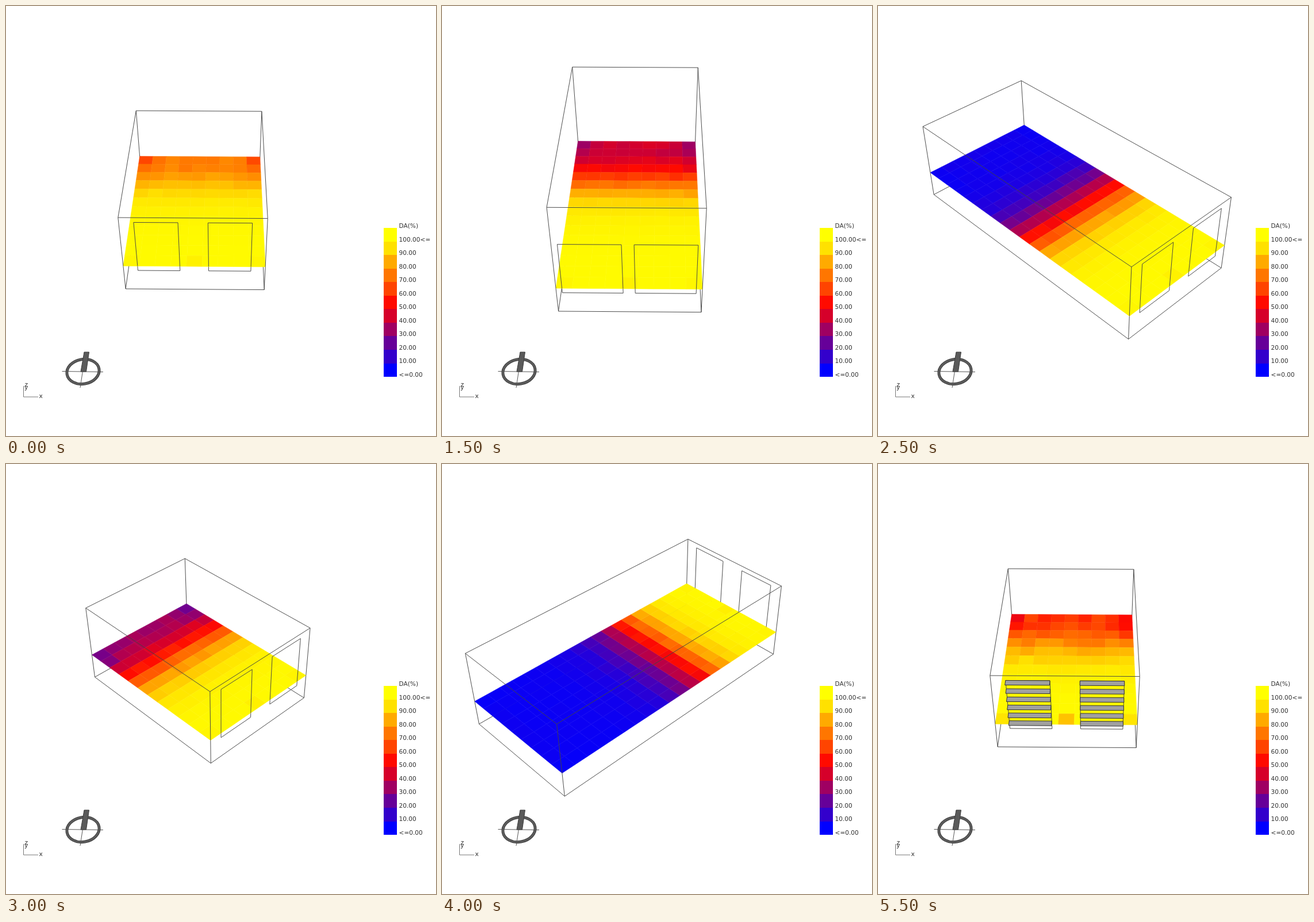
Write an HTML page with a canvas that moves like this. It is 748 px wide and 748 px high and loops after 6000 ms.

```html
<!DOCTYPE html>
<html lang="en">
<head>
<meta charset="utf-8">
<title>Daylight autonomy study</title>
<style>
  html, body { margin: 0; width: 100%; height: 100%; overflow: hidden; background: #fff; }
  #stage { position: relative; width: 748px; height: 748px; }
  canvas, svg { position: absolute; left: 0; top: 0; }
  text { font: 10.6px "DejaVu Sans", Verdana, sans-serif; fill: #333; }
</style>
</head>
<body>
<div id="stage">
  <canvas id="view" width="748" height="748"></canvas>
  <svg width="748" height="748" viewBox="0 0 748 748">
    <g id="legend"><text x="683.5" y="386">DA(%)</text></g>
    <g fill="none" stroke="#777">
      <path d="M30.5 661V680H56"/>
      <g transform="rotate(-10 134 636)">
        <ellipse cx="134" cy="636" rx="28.3" ry="21.4" stroke="#383838" stroke-width="5"/>
        <ellipse cx="134" cy="636" rx="28.3" ry="21.4" stroke="#5c5c5c" stroke-width="3.2"/>
      </g>
      <path d="M97.5 635.5L169 636.5M137 612L129 664" stroke="#555"/>
      <path d="M136 602H144.5L139.5 636H130Z" fill="#5a5a5a" stroke="#3c3c3c"/>
    </g>
    <text x="57.5" y="682">x</text>
    <text x="32.5" y="662">z</text>
    <text x="32" y="667">y</text>
  </svg>
</div>
<script>
const ctx = document.getElementById('view').getContext('2d');
const STOPS = ['0000ff', '3300cc', '660099', '9f0062', 'd6002a', 'ff0a00',
               'ff4400', 'ff7600', 'ffaa00', 'ffe100', 'ffff00']
  .map(h => [0, 2, 4].map(i => parseInt(h.substr(i, 2), 16)));
const STEP = 500, COLS = 9, FLOOR = -2.03, SILL = -.38, HEAD = 3.61;

// rows: depth in cells; low: daylight far from the windows;
// reach: distance at which daylight has dropped halfway to low
const room = (rows, low, reach, more) => ({ rows, low, reach, turn: 0, height: 2.5, louvers: 0, ...more });
const scenes = [
  room(12, 62, 9),
  room(16, 9, 10.2),
  room(16, 20, 10.5, { height: 3 }),
  room(16, 33, 10.85, { height: 3.5 }),
  room(20, 4, 9.6),
  room(20, 3, 9.4, { turn: 45 }),
  room(12, 20, 8, { turn: 45 }),
  room(12, 13, 7.25, { turn: 135 }),
  room(20, 2, 7.5, { turn: 135 }),
  room(16, 2, 8.95, { turn: 225, height: 3.5 }),
  room(12, 55, 8.8),
  room(12, 48, 8.5, { louvers: 6 })
];

function colour(v) {
  const t = Math.max(0, Math.min(99.99, v)) / 10, i = Math.floor(t);
  return `rgb(${STOPS[i].map((c, k) => Math.round(c + (STOPS[i + 1][k] - c) * (t - i)))})`;
}

function noise(a, b, c) {
  const n = Math.sin(a * 12.99 + b * 78.23 + c * 37.72) * 43758.55;
  return (n - Math.floor(n)) * 2 - 1;
}

function daylight(s, id, r, c) {
  const dist = s.rows - r - .5, side = (c - 4) / 4;
  const v = s.low + (98.5 - s.low) / (1 + Math.exp((dist - s.reach) / 1.45));
  const spread = Math.min(1, (100 - v) / 30, v / 15);
  const corner = 9 * Math.pow(side, 6) * Math.exp(-r / 2);
  const wall = 4 * Math.exp(-2 * r);
  // the pier and the side walls shade the cells next to the facade
  const facade = dist < 1 ? (c === 4 ? 1 : Math.pow(side, 8) / 2) * (s.louvers ? 14 : 3) : 0;
  return v + spread * (noise(r, c, id) * (s.louvers ? 4 : 2.2) - corner + wall) - facade;
}

// Fixed perspective camera; the room turns about the origin of the work plane.
function camera(turn) {
  const q = turn * Math.PI / 180 - .0092;
  const cos = Math.cos(q), sin = Math.sin(q);
  return ([x, y, z]) => {
    const a = x * cos - y * sin, b = x * sin + y * cos;
    const w = 1 + .013888 * b - .0116 * z;
    return [374 + (25.19 * a - 41.3) / w, 373.6 + (-24.1 - 16.154 * b - 19.33 * z) / w];
  };
}

function trace(points) {
  ctx.beginPath();
  points.forEach(p => ctx.lineTo(p[0], p[1]));
}

// Outline of a quad as four edges
const loop = pts => pts.map((p, i) => [p, pts[(i + 1) % pts.length]]);

function boxEdges(w, d, top) {
  const ring = z => [[-w, -d, z], [w, -d, z], [w, d, z], [-w, d, z]];
  const lower = ring(FLOOR), upper = ring(top);
  return [...loop(lower), ...loop(upper), ...lower.map((p, i) => [p, upper[i]])];
}

const windowEdges = (mid, half, y) =>
  loop([[mid - half, y, SILL], [mid + half, y, SILL], [mid + half, y, HEAD], [mid - half, y, HEAD]]);

// Draws the part of each edge on one side of the work plane.
function drawEdges(edges, project, side) {
  ctx.strokeStyle = '#444';
  ctx.lineWidth = .95;
  const clip = p => [p[0], p[1], side * Math.max(0, p[2] * side)];
  for (const [a, b] of edges) {
    if (a[2] * side <= 0 && b[2] * side <= 0) continue;
    trace([project(clip(a)), project(clip(b))]);
    ctx.stroke();
  }
}

// Fills a flat rectangle reaching from y to y - depth.
function slab(project, x, y, z, width, depth, fill, stroke, line) {
  trace([[x, y, z], [x + width, y, z], [x + width, y - depth, z], [x, y - depth, z]].map(project));
  ctx.closePath();
  ctx.fillStyle = fill;
  ctx.strokeStyle = stroke;
  ctx.lineWidth = line;
  ctx.fill();
  ctx.stroke();
}

function draw(id) {
  const s = scenes[id], project = camera(s.turn);
  const d = s.rows / 2, w = COLS / 2, mids = [-w / 2, w / 2];
  const top = s.height * 2.405 + FLOOR;
  const half = .223 * (top - FLOOR);   // constant window-to-wall ratio
  const edges = [...boxEdges(w, d, top), ...mids.flatMap(m => windowEdges(m, half, -d))];
  ctx.fillStyle = '#fff';
  ctx.fillRect(0, 0, 748, 748);
  drawEdges(edges, project, -1);
  for (let r = 0; r < s.rows; r++) {
    for (let c = 0; c < COLS; c++) {
      const fill = colour(daylight(s, id, r, c));
      slab(project, c - w, d - r, 0, 1, 1, fill, fill, .5);
    }
  }
  drawEdges(edges, project, 1);
  for (let i = 0; i < s.louvers; i++) {
    const z = HEAD - i * (HEAD - SILL) / s.louvers;
    mids.forEach(m => slab(project, m - half, -d, z, 2 * half, .43, '#a0a0a0', '#333', 1));
  }
}

const blocks = STOPS.map((_, i) => {
  const v = 100 - i * 10, n = v.toFixed(2);
  const label = v === 100 ? n + '&lt;=' : v === 0 ? '&lt;=' + n : n;
  return `<rect x="656.5" y="${386 + i * 23.55}" width="23" height="23.55"
      shape-rendering="crispEdges" fill="rgb(${STOPS[10 - i]})"/>
    <text x="683.5" y="${409.7 + i * 23.52}">${label}</text>`;
});
document.getElementById('legend').innerHTML += blocks.join('');

let shown = -1;
function tick() {
  const id = Math.floor(performance.now() / STEP) % scenes.length;
  if (id !== shown) draw(shown = id);
  requestAnimationFrame(tick);
}
tick();
</script>
</body>
</html>
```
